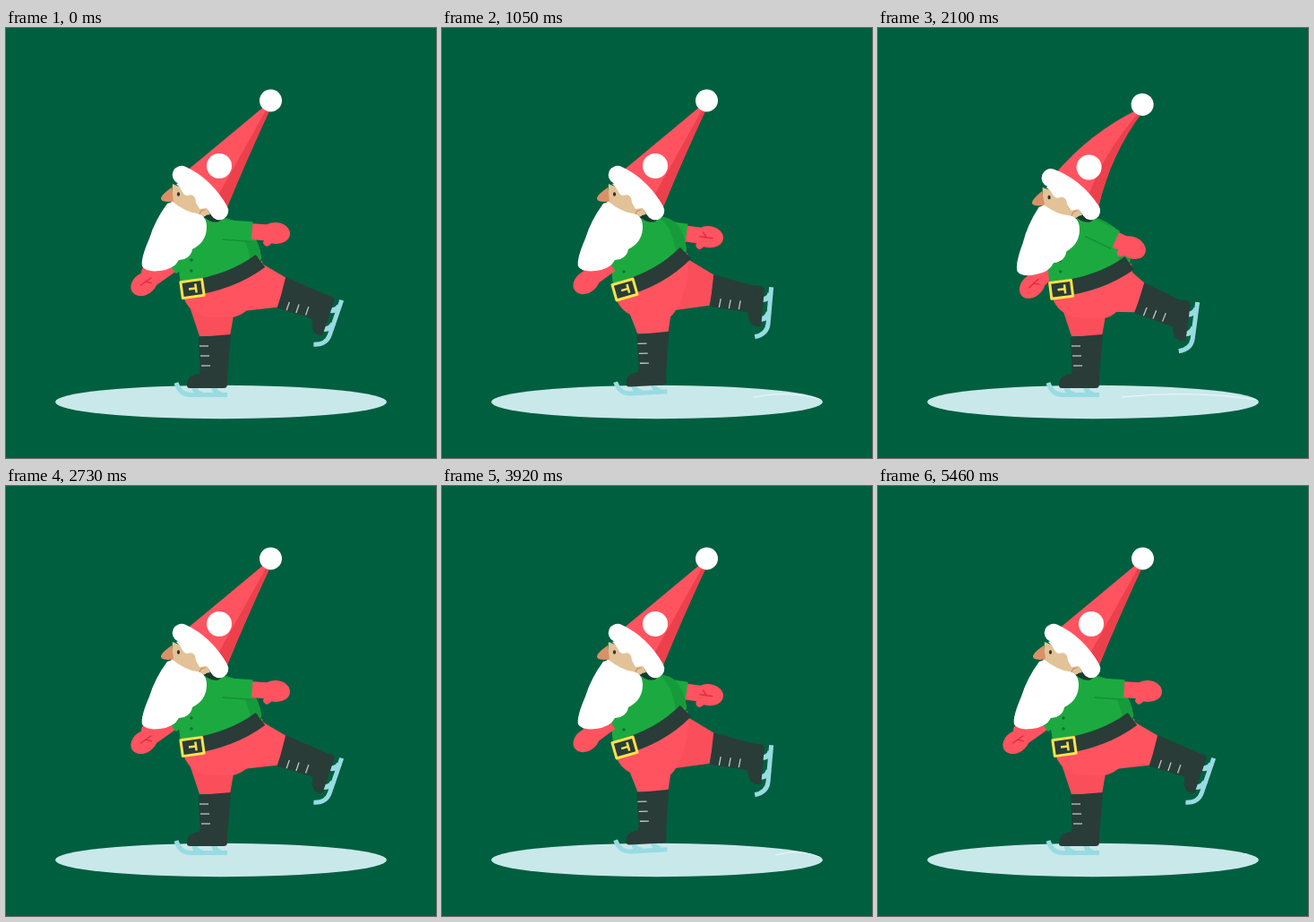
These frames come from a looping animation (480 by 480 pixels, 5.53 s). An HTML page with a canvas:

```html
<!DOCTYPE html>
<html lang="en">
<head>
<meta charset="utf-8">
<title>Skating gnome</title>
<style>
html, body { margin: 0; width: 100%; height: 100%; overflow: hidden; background: #005f3f; }
canvas { display: block; }
</style>
</head>
<body>
<canvas id="stage" width="480" height="480"></canvas>
<script>
const c = document.getElementById('stage').getContext('2d');
const LOOP = 5530, STEP = 70, CYCLE = LOOP / 2, HALF = CYCLE / 2, RAD = Math.PI / 180;
const RED = '#ff5360', DARK_RED = '#ec404c', GREEN = '#1caa40', BOOT = '#293c38',
      BLADE = '#98dbe2', WHITE = '#fff', YELLOW = '#ffe14d', SKIN = '#e3c297';

const ramp = (t, from, to) => Math.min(1, Math.max(0, (t - from) / (to - from)));
const ease = (t, from, to) => { const u = ramp(t, from, to); return u * u * (3 - 2 * u); };
const mix = (a, b, u) => a.map((v, i) => v + (b[i] - v) * u);

// Ankle x, y on the ice and kicked back, with the angles of shaft and foot.
const NEAR_LEG = { stand: [236, 382, -1, -3], back: [347, 309, -71, -71] };
const FAR_LEG = { stand: [233, 385, 0, 0], back: [342, 301, -79, -85] };
const NEAR_REACH = { back: [300, 229], front: [162, 283] };
const FAR_REACH = { back: [297, 233], front: [155, 285] };
// Buckle x, y and tilt, then the rear end of the belt.
const WAIST = {
  farGlide: [208, 291, -8, 284, 260],
  nearGlide: [204, 292, -16, 272, 251],
  upright: [200, 293, -4, 278, 268]
};

function fill(path, color) {
  c.fillStyle = color;
  c.fill(new Path2D(path));
}
function line(path, color, width, cap = 'round') {
  c.strokeStyle = color;
  c.lineWidth = width;
  c.lineCap = cap;
  c.lineJoin = 'round';
  c.stroke(new Path2D(path));
}
function oval(x, y, rx, ry, color) {
  c.fillStyle = color;
  c.beginPath();
  c.ellipse(x, y, rx, ry, 0, 0, 7);
  c.fill();
}
function place(x, y, angle, draw) {
  c.save();
  c.translate(x, y);
  c.rotate(angle * RAD);
  draw();
  c.restore();
}
function around(x, y, angle, draw) {
  place(x, y, angle, () => { c.translate(-x, -y); draw(); });
}

function ice(half) {
  oval(240, 417.5, 185, 18.7, '#c9e8ea');
  const start = Math.max(242, 248 + .23 * (half - 613));
  const front = 362 + .57 * (half - 613), end = Math.min(425, front);
  if (start >= end) return;
  c.save();
  c.clip(new Path2D('M55 417.5A185 18.700 0 0 1 425 417.5A185 18.700 0 0 1 55 417.5'));
  const drop = Math.max(0, end - 362) * .11;
  line(`M${start} 412Q${(start + end) / 2} ${406 - drop / 3} ${end} ${408 + drop}`, '#eef9f9', 1);
  c.restore();
}

// The kick starts fast and settles; the return is smooth.
function leg({ stand, back }, time, color) {
  const q = time % CYCLE;
  const kick = 1 - ease(q, 60, 500) + Math.sin(ramp(q, 1845, 2238) * Math.PI / 2);
  const arc = kick * (1 - kick);
  let [x, y, shaft, foot] = mix(stand, back, kick);
  y -= 25 * arc;
  shaft -= 60 * arc;
  foot -= 170 * arc;

  const s = shaft * RAD, top = [x + 41 * Math.sin(s), y - 41 * Math.cos(s)];
  const lean = top[0] - 233;
  const hip = [230 + lean * .43, 300 - (343 - top[1]) * .31];
  const dir = Math.atan2(top[1] - hip[1], top[0] - hip[0]);
  c.fillStyle = color;
  c.beginPath();
  c.arc(...hip, 28 + lean * .06, dir + Math.PI / 2, dir - Math.PI / 2);
  for (const side of [17, -17]) c.lineTo(top[0] + side * Math.cos(s), top[1] + side * Math.sin(s));
  c.fill();
  place(x, y, foot, () => {
    line('M-43 11Q-39 24.500-27 24.500H14', BLADE, 5, 'butt');
    line('M-23 15Q-22 23-14 24M-1 15Q0 23 7 24', BLADE, 6, 'butt');
    fill('M-15-6L-17 1Q-31 3-31 12V14Q-31 17-28 17H10Q14 17 14 13V-6Z', BOOT);
  });
  place(x, y, shaft, () => {
    fill('M-18-40L18-43L14 4Q0 12-16 3Z', BOOT);
    for (let i = 0; i < 3; i++) line(`M${i - 17} ${11 * i - 30}h10`, '#b9cbc8', 1.3, 'butt');
  });
}

function arm({ back, front }, swing, palm) {
  const sx = 241, sy = 225;
  let [x, y] = mix(back, front, swing);
  y += 80 * swing * (1 - swing);
  const [ex, ey] = mix([sx, sy], [x, y], .57 + .1 * swing);
  const angle = Math.atan2(y - sy, x - sx) / RAD;
  line(`M${ex} ${ey}L${x} ${y}`, RED, 18);
  place(x, y, angle, () => {
    oval(1, 0, 16, 12, RED);
    line('M-4 7L-8 11', RED, 8);
    if (palm) line('M-9 1L5 1M-2 1L-6-4', '#d92d43', 1.4);
  });
  line(`M${sx} ${sy}L${ex} ${ey}`, GREEN, 22, 'butt');
  if (!palm && x > 230) place(ex, ey, angle, () => line('M-32 11H-1', '#168f39', 1.5));
}

function torso([bx, by, tilt, rx, ry]) {
  const belt = `L${rx} ${ry}Q${(bx + rx) / 2 + 5} ${(by + ry) / 2 + 9} ${bx - 6} ${by}`;
  fill(`M${bx - 12} ${by}C${bx - 9} ${by + 24} ${bx + 8} ${by + 32} ${bx + 26} ${by + 32}
    L252 ${by + 32}C${rx - 10} ${by + 30} ${rx + 8} ${ry + 28} ${rx + 2} ${ry}Z`, RED);
  fill(`M224 211H240Q${rx - 4} ${ry - 42} ${rx + 1} ${ry - 4}${belt}L${bx - 12} ${by - 2}Q${bx - 20} 255 200 230Z`, GREEN);
  fill(`M240 211Q${rx - 4} ${ry - 42} ${rx + 1} ${ry - 4}L${rx - 11} ${ry}Q${rx - 16} ${ry - 34} 240 211Z`, '#169b3b');
  for (const dy of [-32, -20]) oval(bx - 1, by + dy, 1.7, 1.7, '#0b7134');
  line(belt.replace('L', 'M'), BOOT, 17.5, 'butt');
  place(bx, by, tilt, () => {
    fill('M-13-10H12V10H-13Z', BOOT);
    line('M-12-9H12V9H-12Z', YELLOW, 3);
    line('M4-5V5M4 0H-4', YELLOW, 2.5, 'butt');
  });
}

function head(upright, bend) {
  around(238, 206, -11.5 * upright, () => {
    fill('M186 174L218 188L228 208L205 213L184 198Z', SKIN);
    oval(219, 205, 6, 6, SKIN);
    line('M216 208Q217 203 222 203', '#c98d61', 1.2);
    fill('M185 178Q172 187 173 191Q175 195 187 193.500Z', '#d99068');
    oval(192.500, 185.500, 1.6, 2.3, '#33332f');
    around(200, 205, 3.5 * upright, () => fill(`M186 194L180 196Q166 215 160 235Q150 258 152 266
      Q156 273 172 271Q188 269 193 259Q206 258 208 247Q224 239 224 222Q224 209 213 207
      Q206 206 200 203Q192 199 186 194Z`, WHITE));
    fill('M190 174Q195 178 197 183Q200 189 206 186Q212 187 212 195L216 202L224 201L228 192L204 170Z', WHITE);

    const tx = 293 + 18 * bend, ty = 86 + 19 * bend, dx = -8 * bend, dy = -10 * bend;
    const rear = `L${tx + 3} ${ty + 2}Q${269 + dx} ${146 + dy} 246 202`;
    fill(`M201 160Q${247 + dx} ${122 + dy} ${tx - 3} ${ty}${rear}Z`, RED);
    fill(`M${tx - 1} ${ty + 2}${rear}L236 188Q${259 + dx} ${148 + dy} ${tx - 1} ${ty + 2}Z`, DARK_RED);
    oval(238 + 3 * bend, 154 + 3 * bend, 14, 14, WHITE);
    line('M196 164Q222 176 238 204', WHITE, 20.5);
    oval(tx + 2.5, ty - 5, 12.5, 12.5, WHITE);
  });
}

function frame(now) {
  const time = Math.floor(now / STEP) * STEP % LOOP;
  const phase = time % CYCLE, half = time % HALF;
  const upright = ease(half, 60, 385) - ease(half, 400, 950);
  const bend = ease(half, 150, 560) - ease(half, 580, 850);
  const swing = ease(phase, 60, 850) - ease(phase, 1400, 2300);
  const glide = mix(WAIST.farGlide, WAIST.nearGlide, swing);

  c.fillStyle = '#005f3f';
  c.fillRect(0, 0, 480, 480);
  ice(half < 440 ? half + HALF : half);
  arm(FAR_REACH, 1 - swing, true);
  leg(FAR_LEG, phase + HALF, '#fa4f5b');
  leg(NEAR_LEG, phase, RED);
  torso(mix(glide, WAIST.upright, upright));
  line('M224 209Q230 214 236 213', '#173d31', 7);
  arm(NEAR_REACH, swing, false);
  head(upright, bend);
}

const begin = performance.now();
function loop() {
  frame(performance.now() - begin);
  requestAnimationFrame(loop);
}
loop();
</script>
</body>
</html>
```
